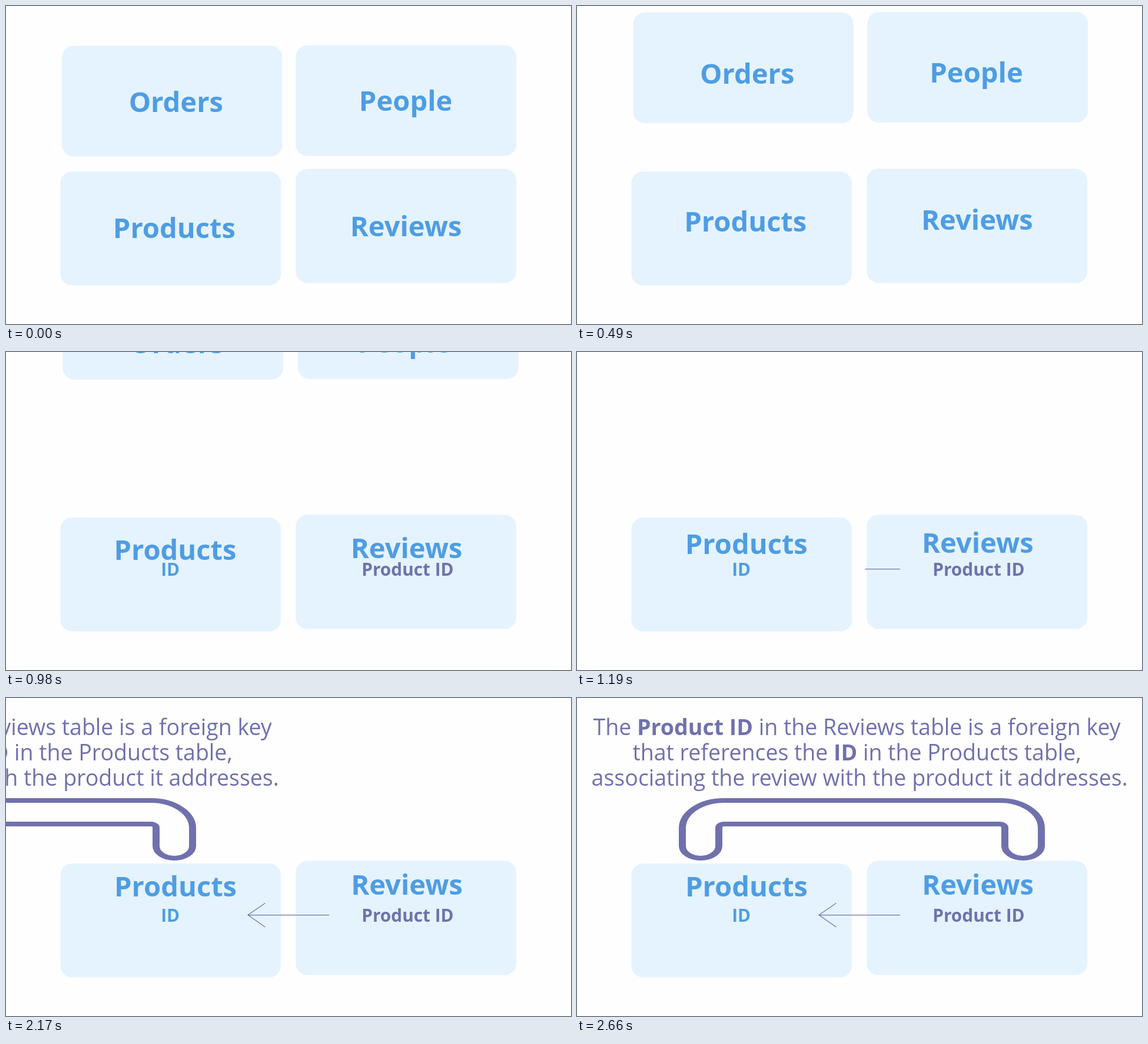
Write an HTML page with a canvas that moves like this. It is 960 px wide and 540 px high and loops after 6300 ms.

```html
<!DOCTYPE html>
<html lang="en">
<head>
<meta charset="utf-8">
<title>Foreign key</title>
<style>
  html, body { margin: 0; width: 100%; height: 100%; overflow: hidden; background: #fefefe; }
  canvas { display: block; width: 100%; height: 100%; }
</style>
</head>
<body>
<canvas id="stage" width="960" height="540"></canvas>
<script>
const ctx = document.getElementById("stage").getContext("2d");

const LOOP = 6300, TICK = 70;
const PAPER = "#fefefe", CARD = "#e5f3ff", BLUE = "#4e9de3", PURPLE = "#7071ac";
const FAMILY = '"Open Sans", "Noto Sans", sans-serif';
const BOLD = "bold ", PLAIN = "";

// Asterisks mark bold runs.
const NOTE = [
  { x: 27.5, text: "The *Product ID* in the Reviews table is a foreign key" },
  { x: 94.5, text: "that references the *ID* in the Products table," },
  { x: 24.6, text: "associating the review with the product it addresses." }
];

const clamp = v => Math.min(1, Math.max(0, v));
const progress = (t, start, length) => clamp((t - start) / length);
const easeInOut = u => u < 0.5 ? 2 * u * u : 1 - 2 * (1 - u) * (1 - u);

function setFont(weight, size) {
  ctx.font = weight + size + "px " + FAMILY;
}

function card(x, y, w, h) {
  ctx.fillStyle = CARD;
  ctx.beginPath();
  ctx.roundRect(x, y, w, h, 20);
  ctx.fill();
}

// Centres the visible ink of the text on cx.
function label(text, cx, baseline, size, color) {
  setFont(BOLD, size);
  const m = ctx.measureText(text);
  ctx.fillStyle = color;
  ctx.fillText(text, cx - (m.actualBoundingBoxRight - m.actualBoundingBoxLeft) / 2, baseline);
}

function title(text, cx, baseline) {
  label(text, cx, baseline, 47.1, BLUE);
}

function arrow(shown) {
  const tip = 411, tail = 549, y = 368.6;
  ctx.save();
  ctx.beginPath();
  ctx.rect(tail - (tail - tip + 2) * shown, 340, 150, 60);
  ctx.clip();
  ctx.strokeStyle = PURPLE;
  ctx.lineWidth = 1.2;
  ctx.beginPath();
  ctx.moveTo(tail, y);
  ctx.lineTo(tip, y);
  ctx.moveTo(440.5, y - 20.3);
  ctx.lineTo(tip, y);
  ctx.lineTo(440.5, y + 20.3);
  ctx.stroke();
  ctx.restore();
}

// Drawn in a space widened 1.5 times, so upright strokes are thicker.
function bracket() {
  const k = 1.5, foot = 251.3, top = 174, bottom = 214;
  const [a, b, c, d] = [179, 241, 727, 789].map(x => x / k);
  const r = (b - a) / 2;
  ctx.save();
  ctx.scale(k, 1);
  ctx.strokeStyle = PURPLE;
  ctx.lineWidth = 8;
  ctx.beginPath();
  ctx.arc(a + r, foot, r, Math.PI, 0, true);
  ctx.arcTo(b, bottom, c, bottom, 6);
  ctx.arcTo(c, bottom, c, foot, 6);
  ctx.lineTo(c, foot);
  ctx.arc(c + r, foot, r, Math.PI, 0, true);
  ctx.arcTo(d, top, a, top, 47);
  ctx.arcTo(a, top, a, foot, 47);
  ctx.closePath();
  ctx.stroke();
  ctx.restore();
}

function note() {
  ctx.fillStyle = PURPLE;
  NOTE.forEach((line, row) => {
    let x = line.x;
    line.text.split("*").forEach((run, i) => {
      setFont(i % 2 ? BOLD : PLAIN, 37.5);
      ctx.fillText(run, x, 62.8 + 43 * row);
      x += ctx.measureText(run).width;
    });
  });
}

function draw(t) {
  ctx.fillStyle = PAPER;
  ctx.fillRect(0, 0, 960, 540);

  const e = easeInOut(progress(t, 0, 1575));
  card(95 + 2 * e, 67.6 - 292 * e, 374.5, 188);
  card(492.3 + 5 * e, 66.6 - 292 * e, 374.7, 188);
  card(92.4, 281, 374.6, 193.5);
  card(492.3, 276.5, 374.7, 194);

  title("Orders", 289.1 + 2 * e, 179.6 - 248 * e);
  title("People", 680.2 - 3 * e, 178 - 248 * e);
  title("Products", 287.1 + 2.2 * e, 394 - 57.4 * e);
  title("Reviews", 680.9 + 1.4 * e, 391 - 57.2 * e);

  ctx.globalAlpha = progress(t, 650, 330);
  label("ID", 279.6, 380, 29.8, BLUE);
  label("Product ID", 682.9, 380, 29.8, PURPLE);
  ctx.globalAlpha = 1;

  if (t > 985) arrow(progress(t, 985, 480));

  if (t >= 2170) {
    const left = 1 - progress(t, 2170, 490);
    ctx.save();
    ctx.translate(-472 * left ** 3.5, 0);
    note();
    bracket();
    ctx.restore();
  }
}

const start = performance.now();
function frame() {
  const t = Math.max(0, performance.now() - start) % LOOP;
  draw(Math.floor(t / TICK) * TICK);
  requestAnimationFrame(frame);
}
frame();
</script>
</body>
</html>
```
